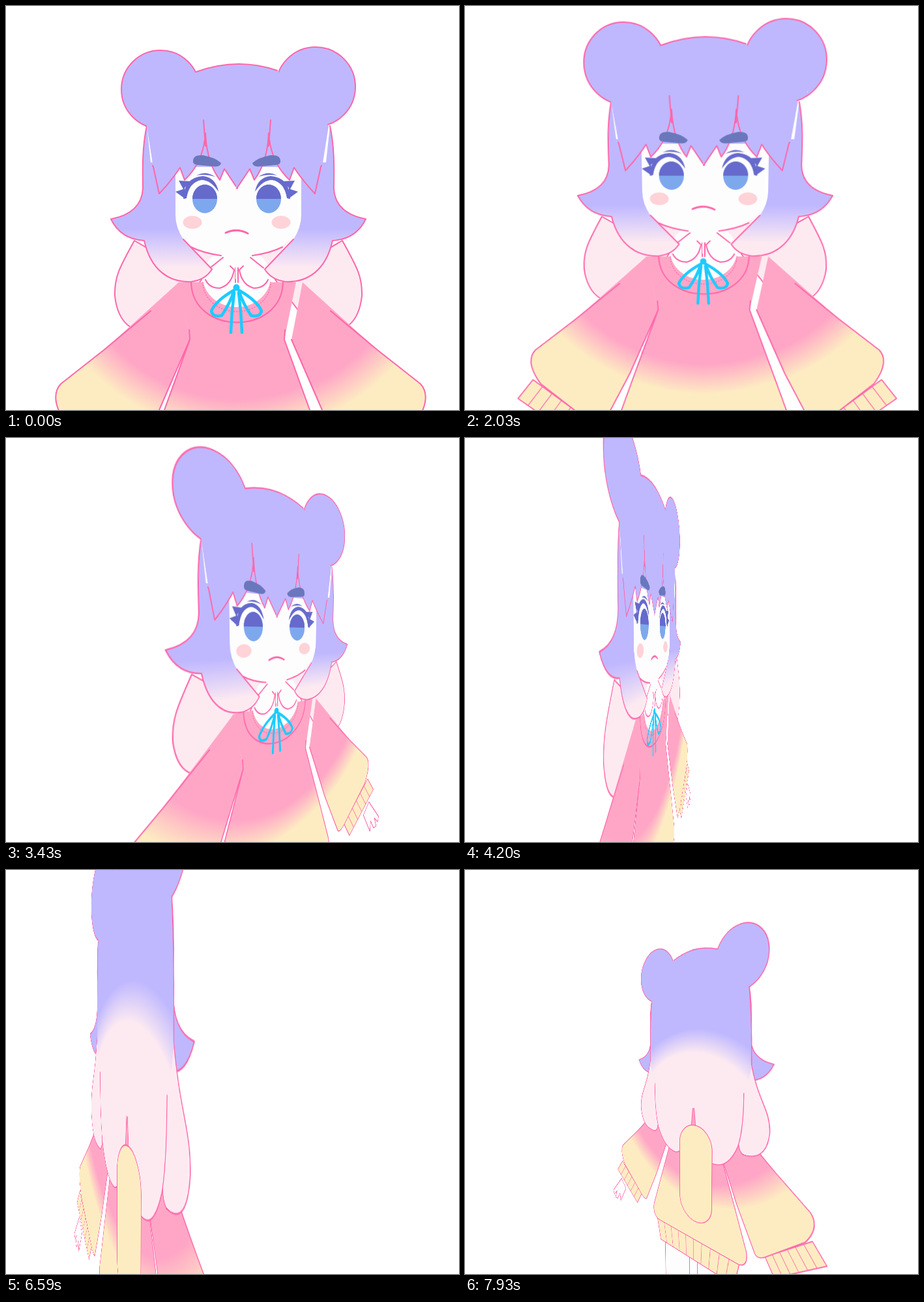
Animation, 695 px wide and 620 px high, one loop 8 s. Source, as an HTML page:

```html
<!DOCTYPE html>
<html lang="en">
<head>
<meta charset="utf-8">
<title>Turning paper doll</title>
<style>
html, body { margin: 0; width: 100%; height: 100%; overflow: hidden; background: #fff; }
#stage { position: relative; width: 695px; height: 620px; overflow: hidden; }
#stage svg { position: absolute; left: 0; top: 0; transform-origin: 0 0; overflow: visible; }
.line, .edge { stroke: #ff66aa; stroke-width: 2; stroke-linejoin: round; stroke-linecap: round; }
.thin { stroke-width: 1.3; }
.mouth { stroke-width: 3; }
.hair { fill: #bfb8ff; }
.pale { fill: #fdeaf1; }
.cream { fill: #fdecc2; }
.white { fill: #fdfdfe; }
.knit { fill: url(#knit); }
.lock { fill: url(#lock); }
.nape { fill: url(#nape); }
.dark { fill: #666acc; }
.brow { fill: #6a77bd; }
.iris { fill: #7ea8ee; }
.cheek { fill: #ffd3d8; }
.knot { fill: #1ccbff; }
.bow { stroke: #1ccbff; stroke-width: 4.5; stroke-linecap: round; stroke-linejoin: round; }
.line, .bow { fill: none; }
</style>
</head>
<body>
<div id="stage">
  <svg width="0" height="0">
    <defs>
      <radialGradient id="knit" gradientUnits="userSpaceOnUse" cx="360" cy="335" r="322">
        <stop offset=".835" stop-color="#ffa6c6"/><stop offset="1" stop-color="#fdecc2"/>
      </radialGradient>
      <radialGradient id="nape" gradientUnits="userSpaceOnUse" cx="356" cy="517" r="262">
        <stop offset=".8" stop-color="#fdeaf1"/><stop offset="1" stop-color="#bfb8ff"/>
      </radialGradient>
      <linearGradient id="lock" gradientUnits="userSpaceOnUse" x1="0" y1="342" x2="0" y2="402">
        <stop offset="0" stop-color="#bfb8ff"/><stop offset="1" stop-color="#fdeaf1"/>
      </linearGradient>
    </defs>
  </svg>
  <svg id="front" width="712" height="1000"></svg>
  <svg id="back" width="712" height="1000"></svg>
</div>
<script>
const path = (cls, d) => `<path class="${cls}" d="${d}"/>`;
const oval = (cls, x, y, rx, ry = rx) => `<ellipse class="${cls}" cx="${x}" cy="${y}" rx="${rx}" ry="${ry}"/>`;
const both = (axis, s) => `${s}<g transform="matrix(-1 0 0 1 ${2 * axis} 0)">${s}</g>`;

// A ribbed cuff between the edges a-b (top) and c-d (bottom).
function cuff(a, b, c, d, ribs) {
  const mix = (p, q, k) => p.map((v, i) => v + (q[i] - v) * k);
  let lines = '';
  for (let i = 1; i < ribs; i++) lines += `M${mix(a, b, i / ribs)}L${mix(c, d, i / ribs)}`;
  return path('cream edge', `M${a}L${b}L${d}L${c}Z`) + path('line thin', lines);
}

// Clothes, shared by both sides
const sleeve = 'L84 580Q66 600 90 638L168 706Q184 718 190 708L235 620 282 512';
const flank = 'L282 512 243 620 209 715Q204 745 226 752H357';
const clothes =
  both(356, path('white edge', 'M256 790V990H343V790Z') +
    path('white edge', 'M62 688L16 740 20 752 36 736 26 760 38 760 52 738 54 762 84 712Z')) +
  both(360, cuff([78, 631], [167, 704], [52, 664], [146, 738], 6) +
    path('knit', 'M265 424L150 528' + sleeve + 'Z') + path('line', 'M222 468L150 528' + sleeve)) +
  cuff([226, 752], [486, 752], [238, 806], [474, 806], 10) +
  both(354.5, path('knit', 'M264 424' + flank + 'V424Z') + path('line', 'M281 497' + flank));

// Hair
const ears = oval('hair edge', 237, 128, 60) + oval('hair edge', 475, 124, 61);
const crown = 'M292 101Q355 78 416 99';
const flick = 'M216 184C208 220 210 260 210 280Q208 318 161 327Q176 358 212 360';
const lock = flick + 'C222 405 250 425 285 423Q306 420 316 404L272 358';
const fringe = 'L226 247 235 288Q254 268 267 248L274 267Q303 240 306 195Q308 240 328 267L335 250 355 280';
const lobe = 'M207 330C190 400 165 410 165 455Q170 512 222 510Q232 505 233 490';
const nape = 'Q222 460 235 497Q260 552 300 549Q340 535 350 470L354 433';
const temple = 'M216 184C208 240 208 300 207 330';

// Face
const eye =
  path('dark', 'M272 296Q273 263 302 261 322 263 326 285 314 267 300 267 281 270 277 295Z') +
  path('dark', 'M265 268L284 269 274 279 275 296 260 285 272 281Z') +
  path('dark', 'M292 260Q306 252 321 262 306 257 292 260Z') +
  oval('iris', 305, 296, 19, 22) + path('dark', 'M286 296A19 22 0 0 1 324 296Z') +
  oval('cheek', 286, 332, 14.5, 10);

const front = document.getElementById('front'), back = document.getElementById('back');

front.innerHTML =
  both(356.5, path('pale edge', 'M197 360C175 400 166 415 167 445Q174 510 240 500L300 420Z')) +
  clothes +
  path('pale', 'M268 350H442L400 405H312Z') +
  oval('white', 354, 416, 52, 46) +
  '<path class="line thin" stroke-dasharray="1 3" d="M302 424A52 45 0 0 0 406 424"/>' +
  path('line', 'M284 424C286 506 423 506 425 424') +
  both(354, path('white', 'M356 380H330L311 405Q316 460 349 410L356 420Z') +
    path('line', 'M333 386L313 402M306 420Q312 433 328 433 346 428 350 405L344 399M352 402V424') +
    path('white', 'M356 200H260V325C262 364 292 376 332 382H356Z') +
    path('line', 'M284 370Q302 379 330 383') + eye) +
  path('line mouth', 'M337 348Q354 340 371 349') +
  both(356.5, path('lock', lock + 'Q260 340 260 320V240H222Z') + path('line', lock)) +
  ears +
  path('hair', crown + 'L495 184 485 247H226L216 184Z') +
  both(354.5, path('hair', 'M216 184' + fringe + 'H356V184Z') +
    path('line', 'M225 245' + fringe + 'M303 175L306 215')) +
  path('line', crown) +
  both(354, path('brow', 'M287 238Q287 228 302 229 320 232 330 241 329 248 316 246L294 244Q286 243 287 238Z')) +
  both(353.5, path('bow', 'M350 436Q322 452 315 468 317 478 331 475 344 456 350 436M350 440Q346 470 345 501')) +
  oval('knot', 353.5, 432, 5);

back.innerHTML =
  both(356.5, path('hair edge', flick + 'L260 350V184Z')) +
  clothes + ears +
  both(356, path('pale', lobe + 'L260 380Z') + path('line', lobe)) +
  both(356, path('nape', temple + 'Q212 370 223 386' + nape + 'H357V87Q320 90 292 101Z') +
    path('line', temple + 'M223 386' + nape)) +
  path('line', crown) +
  '<rect class="cream edge" x="301" y="472" width="100" height="233" rx="50"/>';

// time, centre x, centre y, width, height, perspective, optional hold
const poses = [
  [0, 355, 327, 1, 1, 0, 560],
  [700, 351, 327, .99, 1, .0002, 350],
  [1190, 357, 323, 1.01, 1.01, 0, 350],
  [1890, 365, 279, 1.03, 1, 0],
  [2030, 367, 291, 1, .98, 0],
  [2170, 366, 318, 1, .99, 0, 280],
  [3290, 405, 320, .85, .95, .0006],
  [3430, 416, 320, .677, .955, .0012],
  [4200, 291, 318, .278, .98, .00188],
  [5390, 395, 339, -.09, .975, .0018],
  [5600, 378, 335, -.14, 1, .0018, 280],
  [6580, 186, 256, -.376, 1.18, .0015],
  [7280, 400, 285, -.78, .95, .0008],
  [7630, 375, 296, -.62, .72, .0009],
  [7910, 351, 294, -.511, .69, .001]
];

function poseAt(time) {
  const next = poses.findIndex(p => p[0] > time);
  if (next < 0) return poses[poses.length - 1];
  const a = poses[next - 1], b = poses[next], start = a[0] + (a[6] || 0);
  const k = Math.max(0, (time - start) / (b[0] - start));
  return a.map((v, i) => v + (b[i] - v) * k);
}

function draw(now) {
  const time = Math.floor((now % 8000 + 5) / 70) * 70;
  const [, cx, cy, width, height, px] = poseAt(time);
  const py = .00018 * Math.min(1, Math.max(0, (time - 1540) / 350));
  const matrix = new DOMMatrix([
    width + cx * px, (cy - 18) * px, 0, px,
    cx * py, height + cy * py, 0, py,
    0, 0, 1, 0,
    cx, cy, 0, 1
  ]).translate(-355, -327);
  front.style.transform = back.style.transform = matrix;
  front.style.visibility = width > 0 ? 'visible' : 'hidden';
  back.style.visibility = width > 0 ? 'hidden' : 'visible';
  requestAnimationFrame(draw);
}
requestAnimationFrame(draw);
</script>
</body>
</html>
```
